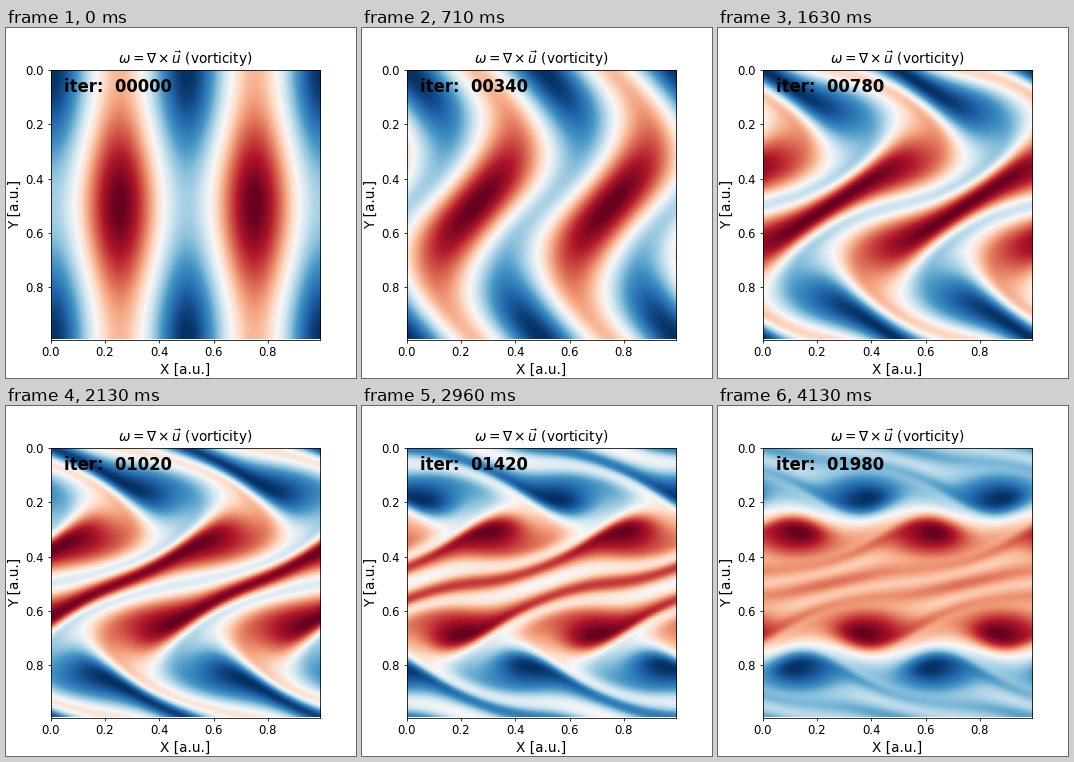
Recreate the animation shown at these times as a matplotlib script. Size 350 by 350 pixels, loop 4180 ms.

```python
import numpy as np
import matplotlib.pyplot as plt
from matplotlib.animation import FuncAnimation

N = 128          # grid points per side
NU = 1e-3        # viscosity
DT = 5e-4        # time per iteration
SHOW = 20        # iterations between pictures
PICTURES = 100
SUBSTEPS = 3
TICK = 10        # ms
LOOP = 4180      # ms

# The flow has period 1/2 in x, so half the width is enough.
M = N // 2
x, y = np.meshgrid(np.arange(M) / N, np.arange(N) / N)
kx = 4 * np.pi * np.fft.rfftfreq(M, 1 / M)[None, :]
ky = 2 * np.pi * np.fft.fftfreq(N, 1 / N)[:, None]
k2 = kx**2 + ky**2
inv_k2 = 1 / np.where(k2 == 0, 1, k2)
k_max = 2 / 3 * np.pi * N
keep = (kx < k_max) & (abs(ky) < k_max)


def real(f):
    return np.fft.irfft2(f, s=(N, M))


def advect(w):
    psi = w * inv_k2
    u, v = real(1j * ky * psi), real(-1j * kx * psi)
    flux = u * real(1j * kx * w) + v * real(1j * ky * w)
    return np.where(keep, -np.fft.rfft2(flux), 0)


def rk4(w, h):
    """One step with the viscous part integrated exactly."""
    half = np.exp(-NU * k2 * h / 2)
    a = advect(w)
    b = advect(half * (w + h / 2 * a))
    c = advect(half * w + h / 2 * b)
    d = advect(half**2 * w + h * half * c)
    return half**2 * (w + h / 6 * a) + h / 3 * half * (b + c) + h / 6 * d


def simulate():
    w = -4 * np.pi * np.cos(4 * np.pi * x) - 2 * np.pi * np.cos(2 * np.pi * y)
    w = np.fft.rfft2(w)
    for _ in range(PICTURES):
        yield np.tile(real(w), 2)
        for _ in range(SUBSTEPS):
            w = rk4(w, DT * SHOW / SUBSTEPS)


fields = list(simulate())

plt.rcParams.update({"font.family": "DejaVu Sans", "font.size": 12})
fig, ax = plt.subplots(figsize=(5, 5), dpi=70)
end = 1 - 1 / N
im = ax.imshow(fields[0], cmap="RdBu_r", extent=(0, end, end, 0))
ax.set_title(r"$\omega = \nabla \times \vec{u}$ (vorticity)", fontsize=14)
ax.set_xlabel("X [a.u.]", fontsize=14)
ax.set_ylabel("Y [a.u.]", fontsize=14)
label = ax.text(0.05, 0.92, "", transform=ax.transAxes, fontsize=17,
                weight="bold")


def update(tick):
    # 24 pictures per second, starting on whole ticks
    n = min((24 * tick + 11) // 100, PICTURES - 1)
    peak = abs(fields[n]).max()
    im.set_data(fields[n])
    im.set_clim(-peak, peak)
    label.set_text(f"iter:  {n * SHOW:05d}")
    return im, label


anim = FuncAnimation(fig, update, frames=LOOP // TICK, interval=TICK,
                     repeat=True, repeat_delay=0)
plt.show()
```
